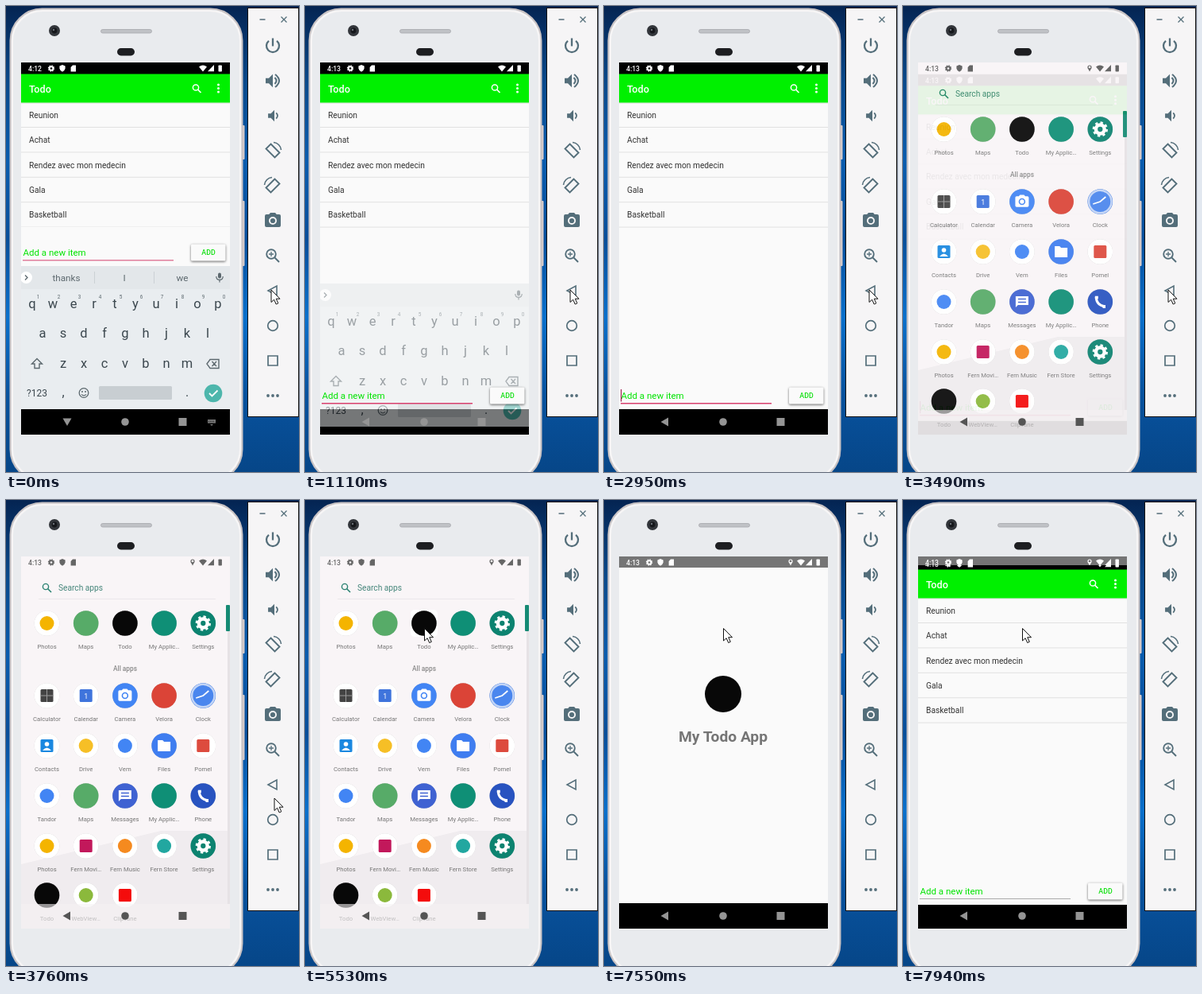
Animation, 369 px wide and 586 px high, one loop 8 s. Source, as an HTML page:

```html
<!DOCTYPE html>
<html lang="en">
<head>
<meta charset="utf-8">
<title>Todo app demo</title>
<style>
html, body { margin: 0; width: 100%; height: 100%; overflow: hidden; }
svg { display: block; width: 369px; height: 586px; font-family: Roboto, "Open Sans", sans-serif; }
.raised { filter: drop-shadow(0 1px 1.5px #0009); }
.disc { filter: drop-shadow(0 .5px .7px #0003); }
</style>
</head>
<body>
<svg id="stage" viewBox="0 0 369 586"></svg>
<script>
const stage = document.getElementById('stage');

// Drawing helpers
const rect = (x, y, w, h, fill, more = '') => `<rect x="${x}" y="${y}" width="${w}" height="${h}" fill="${fill}" ${more}/>`;
const disc = (x, y, r, fill, more = '') => `<circle cx="${x}" cy="${y}" r="${r}" fill="${fill}" ${more}/>`;
const path = (d, fill, more = '') => `<path d="${d}" fill="${fill}" ${more}/>`;
const line = (d, color, width = 1, more = '') => path(d, 'none', `stroke="${color}" stroke-width="${width}" ${more}`);
const ring = (x, y, r, color, width) => disc(x, y, r, 'none', `stroke="${color}" stroke-width="${width}"`);
const text = (x, y, size, fill, s, more = '') => `<text x="${x}" y="${y}" font-size="${size}" fill="${fill}" ${more}>${s}</text>`;
const mid = (x, y, size, fill, s, more = '') => text(x, y, size, fill, s, 'text-anchor="middle" ' + more);
const at = (x, y, s, k = 1) => `<g transform="translate(${x} ${y}) scale(${k})">${s}</g>`;
const group = (id, s, more = '') => `<g id="${id}" ${more}>${s}</g>`;

const gear = (r, c) => ring(0, 0, r * .6, c, r * .5) +
  disc(0, 0, r * .9, 'none', `stroke="${c}" stroke-width="${r * .35}" stroke-dasharray="${r * .353}"`);
const camera = c => path('M-3-10L-4.8-8H-8q-2 0-2 2V6q0 2 2 2H8q2 0 2-2V-6q0-2-2-2H4.8L3-10zM0 5a5 5 0 1 1 0-10a5 5 0 1 1 0 10z', c, 'fill-rule="evenodd"') + disc(0, 0, 3.1, c);
const navBar = () => rect(19, 507, 263, 32, '#000');

function status(c, pin) {
  return text(28, 82, 8.6, c, '4:13', 'class="clock" font-weight="500"') +
    at(57, 78.5, gear(3.9, c)) +
    path('M71 74l3.6 1.4v3q-.6 3-3.6 4.4q-3-1.4-3.6-4.4v-3z', c) +
    path('M84 74.5h4v8h-6.4v-5.6z', c) +
    (pin ? ring(235, 77, 2, c, 1.2) + path('M233 78.5h4l-2 4z', c) : '') +
    path('M243 76.4q5-4 10 0l-5 6z', c) + path('M262 74v8.3h-8z', c) +
    rect(267.5, 74.5, 4.4, 8, c, 'rx=".8"');
}

function backdrop() {
  const stops = ['#042452', '#0a4a8c', '#0a5cae', '#084e9a', '#0a70cc', '#08529e', '#064688'];
  return `<defs><linearGradient id="sky" x2="0" y2="1">${stops.map((c, i) => `<stop offset="${i / 6}" stop-color="${c}"/>`).join('')}</linearGradient>
    <clipPath id="screenClip">${rect(19, 71, 263, 468, '#000')}</clipPath>
    <clipPath id="appClip">${rect(19, 71, 263, 468, '#000', 'id="appBox"')}</clipPath>
    <clipPath id="splashClip">${rect(19, 71, 263, 468, '#000', 'id="splashBox"')}</clipPath></defs>` +
    rect(0, 0, 369, 586, 'url(#sky)');
}

function phone() {
  return rect(297, 150, 3.5, 43, '#d8cccb', 'rx="1"') + rect(297, 245, 3.5, 82, '#d8cccb', 'rx="1"') +
    rect(5.5, 3.5, 292, 594, '#e9ebee', 'rx="40" stroke="#c8c2c3" stroke-width="2"') +
    rect(8, 6, 287, 589, 'none', 'rx="38" stroke="#f8f6f6" stroke-width="2"') +
    disc(61, 31, 7, '#33363b') + disc(61, 31, 3.4, '#15171b') + disc(60, 30, 1.2, '#6b7078') +
    rect(119.5, 29.5, 64, 4.5, '#c0c2c6', 'rx="2.2" stroke="#a6a8ad" stroke-width=".8"') +
    rect(140, 53, 22, 9.5, '#1d1e21', 'rx="4.7"');
}

function panel() {
  const c = '#546e7a', o = (d, w = 2) => line(d, c, w);
  const speaker = path('M-9-3.2h4l5-5v16.4l-5-5h-4z', c);
  const turn = o('M-2.5-8.5L8.5 2.5 2.5 8.5-8.5-2.5z', 1.9) + o('M1-10.5A10.5 10.5 0 0 1 10.5-1', 1.6);
  const icons = [
    o('M-5-6.2A8 8 0 1 0 5-6.2M0-9.5V.5', 2.3),
    speaker + o('M2.5-4q4 4 0 8M3-8q10 8 0 16'),
    at(2, 0, speaker + o('M2.5-4q4 4 0 8'), .88),
    turn,
    `<g transform="scale(-1 1)">${turn}</g>`,
    camera(c),
    ring(-2, -2, 5.8, c, 1.9) + o('M2.5 2.5L8 8') + o('M-5-2h6M-2-5v6', 1.3),
    o('M5-6V6L-6 0z', 1.6),
    ring(0, 0, 6.3, c, 1.7),
    o('M-6-6h12v12h-12z', 1.7),
    [-6, 0, 6].map(x => disc(x, 0, 1.9, c)).join('')
  ];
  return rect(304.5, 2.5, 64, 514, '#f6f5f6', 'stroke="#111"') +
    line('M319.5 17h7M346.5 13.5l7 7m0-7l-7 7', c, 1.3) +
    icons.map((s, i) => at(336, 50 + 44 * i, s)).join('');
}

// Launcher: [label, main colour, background disc, glyph]
const dot = c => disc(0, 0, 9, c), square = c => rect(-8, -8, 16, 16, c, 'rx="1.5"');
const apps = {
  photos: ['Photos', '#f4b400', '#fff', dot],
  maps: ['Maps', '', '#57ab68'],
  todo: ['Todo', '', '#080808'],
  mine: ['My Applic…', '', '#0f8f76'],
  settings: ['Settings', '#fff', '#0c8370', c => gear(9, c)],
  calc: ['Calculator', '#444', '#fff', c => square(c) + line('M-8 0H8M0-8V8', '#999')],
  calendar: ['Calendar', '#3f74dc', '#fff', c => square(c) + mid(0, 3.6, 9, '#fff', '1')],
  camera: ['Camera', '#fff', '#4285f4', c => at(0, 0, camera(c), .85)],
  browser: ['Velora', '', '#db4437'],
  clock: ['Clock', '#fff', '#4a86ee', c => ring(0, 0, 14.2, '#c3d5f6', 2.4) + line('M-9 3L0 0L7-6', c, 1.8)],
  contacts: ['Contacts', '#1a88e0', '#fff', c => square(c) + disc(0, -2, 2.8, '#fff') + path('M-5.5 6q5.5-7 11 0z', '#fff')],
  drive: ['Drive', '#f6bf26', '#fff', dot],
  video: ['Vem', '#4285f4', '#fff', dot],
  files: ['Files', '#fff', '#3f7df0', c => path('M-8-7h6l2 2h8v12h-16z', c)],
  mail: ['Pomel', '#dd4b3e', '#fff', square],
  search: ['Tandor', '#4285f4', '#fff', dot],
  messages: ['Messages', '#fff', '#3f62d2', c => path('M-8-7h16v11h-13l-3 3z', c) + line('M-5-3.5h10M-5 .5h10', '#3f62d2', 1.3)],
  phone: ['Phone', '#fff', '#2853c0', c => line('M-5-6Q-5 4 6 6', c, 3) + line('M-6.5-5.5h4M5 4v4', c, 3.4)],
  movies: ['Fern Movi…', '#c2185b', '#fff', square],
  music: ['Fern Music', '#f58a1f', '#fff', dot],
  store: ['Fern Store', '#22a7a0', '#fff', dot],
  web: ['WebView…', '#8bb93c', '#fff', dot],
  clips: ['Clipvane', '#f40c0c', '#fff', square]
};
const rows = [
  [155, 'photos maps todo mine settings'],
  [246, 'calc calendar camera browser clock'],
  [309, 'contacts drive video files mail'],
  [372, 'search maps messages mine phone'],
  [435, 'photos movies music store settings'],
  [497, 'todo web clips']
];

function launcher() {
  const grid = rows.map(([y, names], r) => names.split(' ').map((name, i) => {
    const [label, color, back, glyph] = apps[name];
    return at(51.5 + 49.2 * i, y,
      (r == 0 && name == 'todo' ? rect(-17, -17, 34, 34, '#fff', 'rx="5" id="press"') : '') +
      disc(0, 0, 15.8, back, 'class="disc"') + (glyph ? glyph(color) : '') +
      mid(0, 32, 7.7, '#757575', label));
  }).join('')).join('');
  return rect(19, 71, 263, 468, '#f9f5f7') +
    path('M19 458L195 416H282V539H19z', '#f0ecef') + status('#666', true) +
    ring(50, 109, 3.6, '#2b8272', 1.4) + line('M52.5 111.5l4.5 4.5', '#2b8272', 1.6) +
    text(66, 114.2, 10.2, '#45857a', 'Search apps') + line('M41 124.5H264', '#ebe7ea') +
    rect(279, 164, 3, 344, '#e6e2e5') + rect(277, 132, 5, 33, '#168a74', 'rx="1"') +
    mid(150, 215, 8.3, '#888', 'All apps', 'font-weight="500"') + grid +
    rect(19, 508, 263, 31, '#f6f2f4', 'opacity=".6"');
}

function splash() {
  return rect(19, 71, 263, 468, '#fafafa') + rect(19, 71, 263, 14, '#757575') + status('#fff', true) +
    disc(150, 244, 23, '#080808') + mid(150, 304, 19.2, '#757575', 'My Todo App', 'font-weight="700"') + navBar();
}

function todoApp() {
  const items = ['Reunion', 'Achat', 'Rendez avec mon medecin', 'Gala', 'Basketball'];
  const entry = text(21.5, 314, 11.5, '#00e400', 'Add a new item') +
    rect(21, 319, 190, 1.5, '#d8406e', 'id="underline"') + rect(21, 302, 1.2, 15.5, '#a02050', 'id="caret"') +
    rect(233, 299.5, 43.5, 21, '#fafafa', 'rx="1.5" class="raised"') +
    mid(255, 313.3, 8.8, '#10e010', 'ADD', 'font-weight="500"');
  return rect(19, 71, 263, 468, '#fafafa') + rect(19, 71, 263, 15, '#000') + status('#fff') +
    rect(19, 86, 263, 37, '#0001') + rect(19, 85.5, 263, 36, '#00f000') +
    text(29, 109, 12.6, '#fff', 'Todo', 'font-weight="500"') +
    ring(239, 102.5, 3.6, '#fff', 1.5) + line('M241.5 105l4 4', '#fff', 1.7) +
    [99, 103.5, 108].map(y => disc(267.5, y, 1.5, '#fff')).join('') +
    items.map((s, i) => text(29, 140.8 + 31.4 * i, 10.24, '#333', s) + rect(19, 152 + 31.4 * i, 263, 1, '#e1e1e1')).join('') +
    navBar() + group('keyboard', keyboard()) +
    group('entry', rect(19, 278, 263, 49, '#fafafa', 'id="cover"') + entry);
}

function keyboard() {
  const c = '#3b474e', g = '#5c686e';
  const keys = (s, x, y) => [...s].map((k, i) => mid(x + 26 * i, y, 16.5, c, k)).join('');
  return rect(19, 327, 263, 212, '#e9edf0') + rect(19, 327, 263, 29, '#e3e7ea') +
    disc(25.5, 341.5, 7.5, '#fff') + line('M24 338.5l3 3l-3 3', g, 1.3) +
    group('hints', mid(76, 345.5, 11.7, g, 'thanks') + mid(149, 345.5, 11.7, g, 'I') + mid(222, 345.5, 11.7, g, 'we') +
      line('M111.5 334v15M186.5 334v15', '#cbd1d5')) +
    rect(267, 335.5, 4, 7, g, 'rx="2"') + line('M264.8 340q0 4.4 4.2 4.4t4.2-4.4M269 344v3.5', g, 1.2) +
    keys('qwertyuiop', 33, 379.5) + [...'1234567890'].map((n, i) => mid(40.5 + 26 * i, 367.5, 6.3, g, n)).join('') +
    keys('asdfghjkl', 46, 417) + keys('zxcvbnm', 72, 455) +
    line('M39 443.5l6.5 6.5h-3.5v5.5h-6v-5.5h-3.5z', g, 1.4) +
    line('M253 450l4-5.5h11v11h-11zM259.5 447l5.5 6m0-6l-5.5 6', g, 1.4) +
    mid(39, 490.5, 12, c, '?123') + mid(72, 491, 16, c, ',') + mid(228, 491, 16, c, '.') +
    ring(98, 486.5, 5.8, g, 1.3) +
    disc(96, 485, 1, g) + disc(100, 485, 1, g) + line('M95 488.3q3 3 6 0', g, 1.2) +
    rect(117, 478, 92, 17, '#c8ced2', 'rx="1.5"') +
    disc(261, 487, 11.3, '#4db6ac') + line('M256 487l3.5 3.5l7-7', '#fff', 1.8) + navBar();
}

const navIcons = '<path id="back" d="M81 517.5v11l-9.5-5.5z"/><path id="down" d="M71.5 518.5h11l-5.5 9.5z"/>' +
  '<circle cx="150" cy="523" r="4.8"/><rect x="217.5" y="518" width="10" height="10"/>' +
  group('switcher', rect(254, 520, 10, 4.6, '#777') + line('M255 522.3h8', '#000', .8, 'stroke-dasharray="1"') + path('M257 526h4l-2 2z', '#777'));

stage.innerHTML = backdrop() + phone() + panel() +
  '<g clip-path="url(#screenClip)">' +
  group('launcher', launcher()) + group('splash', splash(), 'clip-path="url(#splashClip)"') +
  group('appWindow', group('app', todoApp()), 'clip-path="url(#appClip)"') +
  group('nav', navIcons) + '</g>' +
  group('mouse', path('M0 0V15.5L3.6 12.2L6.2 18L8.8 16.8L6.2 11.2H11z', '#fff', 'stroke="#111"'));

// Screen refresh times; the picture holds between them
const ticks = [0, 530, 810, 960, 1110, 1260, 1570, 2000, 2400, 2550, 2950, 3220, 3370, 3490, 3640, 3760, 3880, 4030,
  4300, 4420, 4550, 4670, 5100, 5250, 5530, 5650, 5800, 5920, 6200, 6350, 6470, 6740, 6890, 7010, 7160, 7280, 7430, 7550, 7790, 7940];

const $ = id => document.getElementById(id);
const set = (id, attrs) => { for (const k in attrs) $(id).setAttribute(k, attrs[k]); };
const show = (id, on) => set(id, { opacity: +on });
const lerp = (a, b, p) => a + (b - a) * p;

// Interpolates [time, value, value...] keys
function track(t, keys) {
  if (t <= keys[0][0]) return keys[0].slice(1);
  const i = keys.findIndex(k => k[0] > t);
  if (i < 0) return keys[keys.length - 1].slice(1);
  const a = keys[i - 1], b = keys[i], p = (t - a[0]) / (b[0] - a[0]);
  return a.slice(1).map((v, j) => lerp(v, b[j + 1], p));
}

function draw(t) {
  const typing = t < 810, reopened = t >= 7790;
  document.querySelectorAll('.clock').forEach(e => e.textContent = typing ? '4:12' : '4:13');

  // Todo window: fades down on close, revealed upwards on reopening
  const [alpha, drop, top] = reopened
    ? track(t, [[7790, 1, 8, 250], [7940, 1, 2, 82]])
    : track(t, [[3100, 1, 0, 71], [3520, 0, 16, 71]]);
  set('appBox', { y: top, height: 539 - top });
  set('app', { transform: `translate(0 ${drop})` });
  set('appWindow', { opacity: alpha });
  set('entry', { transform: `translate(0 ${typing ? 0 : 180})` });
  show('cover', typing);
  set('underline', { fill: reopened ? '#aaa' : t < 960 ? '#e07f9c' : '#d8406e', height: reopened ? 1 : 1.5 });
  show('caret', t >= 530 && t < 810 || t >= 1570 && t < 2000 || t >= 2400 && !reopened);

  const [kbAlpha, kbDrop] = track(t, [[810, 1, 0], [960, .85, 6], [1110, .5, 22], [1260, 0, 30]]);
  set('keyboard', { opacity: kbAlpha, transform: `translate(0 ${kbDrop})` });
  show('hints', typing);

  show('press', t >= 5530 && t < 5920);

  // Splash window grows out of its icon
  const [grow] = track(t, [[6200, .3], [6350, .8], [6470, 1]]);
  show('splash', t >= 6200);
  set('splashBox', { x: lerp(134, 19, grow), y: lerp(139, 71, grow), width: lerp(32, 263, grow), height: lerp(32, 468, grow) });

  const [tone] = t < 3370 ? [148] : track(t, [[6470, 85], [7550, 148]]);
  set('nav', { fill: `rgb(${tone},${tone},${tone})` });
  show('down', typing);
  show('back', !typing);
  show('switcher', typing);

  const [x, y] = track(t, [[3640, 334, 357], [3760, 338, 375], [4030, 262, 252], [4150, 262, 252],
    [4670, 153, 174], [4960, 153, 174], [5250, 150.5, 161.5]]);
  set('mouse', { transform: `translate(${x} ${y})` });
}

function frame() {
  const t = performance.now() % 8000;
  draw(ticks.filter(k => k <= t).pop());
  requestAnimationFrame(frame);
}
frame();
</script>
</body>
</html>
```
